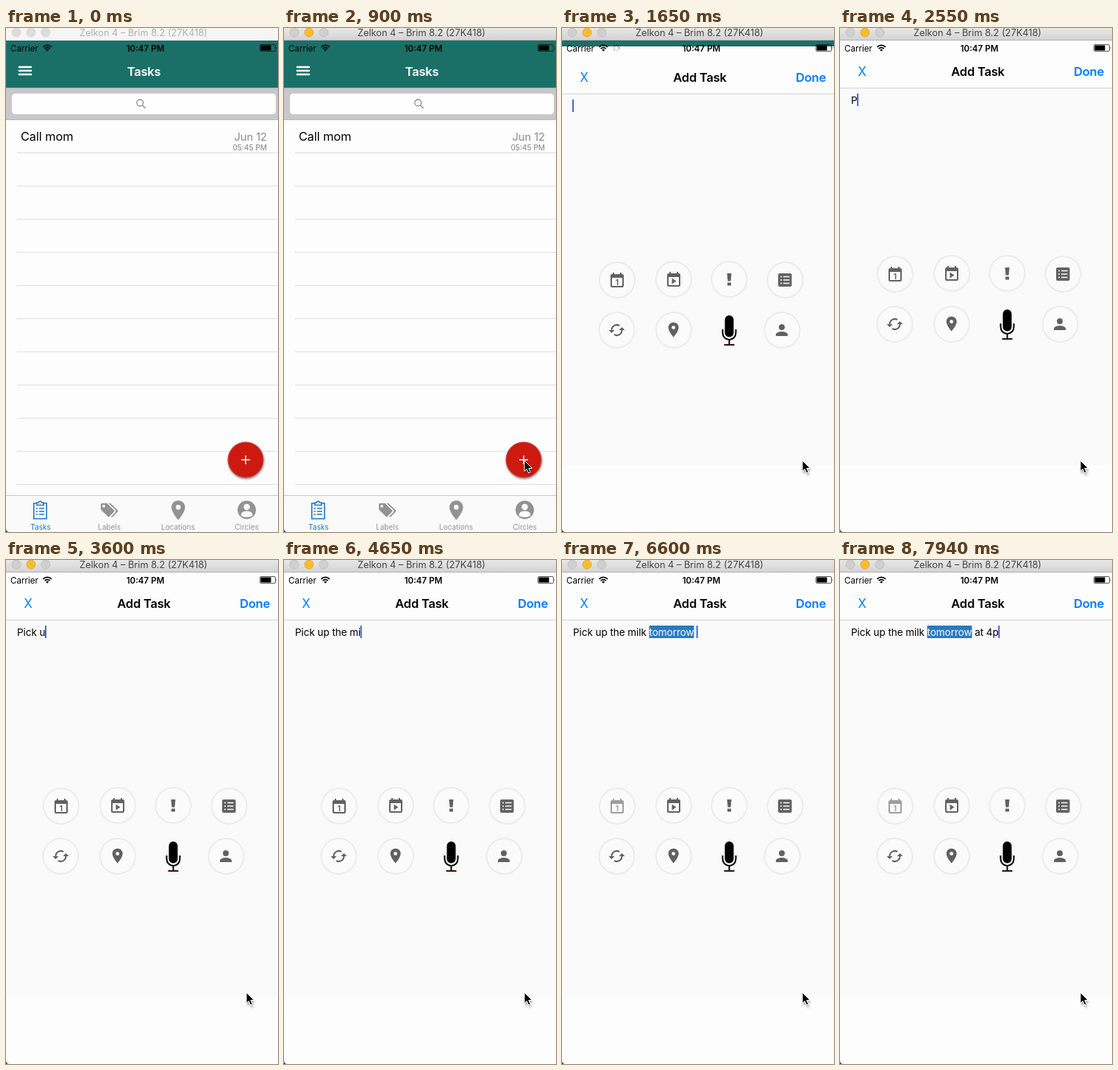
An HTML page that plays this animation: 370 by 684 pixels, repeating every 8000 ms.

```html
<!DOCTYPE html>
<html lang="en">
<head>
<meta charset="utf-8">
<title>Add Task</title>
<style>
  html, body { margin: 0; width: 100%; height: 100%; overflow: hidden; background: #fdfdfd; }
  svg { display: block; width: 370px; height: 684px; font-family: Inter, "Liberation Sans", sans-serif; }
  text { white-space: pre; }
  .mid { text-anchor: middle; }
  .end { text-anchor: end; }
  .nav { font-size: 16.6px; font-weight: 600; letter-spacing: -.25px; }
  .tab { font-size: 10px; text-anchor: middle; fill: #929292; }
  .ring { fill: #fbfbfb; stroke: #ececec; stroke-width: 2; }
  .note { font-size: 13.6px; letter-spacing: -.1px; }
</style>
</head>
<body>
<svg viewBox="0 0 370 684">
  <defs>
    <linearGradient id="bar" x2="0" y2="1"><stop stop-color="#e8e8e8"/><stop offset="1" stop-color="#d2d2d2"/></linearGradient>
    <filter id="soft" x="-30%" y="-30%" width="160%" height="160%"><feGaussianBlur stdDeviation="1.4"/></filter>
    <path id="cal" d="M19 4h-1V2h-2v2H8V2H6v2H5c-1.1 0-2 .9-2 2v14c0 1.1.9 2 2 2h14c1.1 0 2-.9 2-2V6c0-1.1-.9-2-2-2zm0 16H5V9h14z"/>
    <path id="pin" d="M12 2C8.1 2 5 5.1 5 9c0 5.2 7 13 7 13s7-7.8 7-13c0-3.9-3.1-7-7-7zm0 9.5a2.5 2.5 0 010-5 2.5 2.5 0 010 5z"/>
    <path id="person" d="M12 12a4 4 0 100-8 4 4 0 000 8zm0 2c-2.7 0-8 1.3-8 4v2h16v-2c0-2.7-5.3-4-8-4z"/>
    <path id="cycle" d="M19 8l-4 4h3a6 6 0 01-8.8 5.3l-1.5 1.5A8 8 0 0020 12h3zM6 12a6 6 0 018.8-5.3l1.5-1.5A8 8 0 004 12H1l4 4 4-4z"/>
  </defs>

  <!-- task list -->
  <rect width="370" height="684" fill="#fdfdfd"/>
  <rect y="17" width="370" height="64.5" fill="#1a7067"/>
  <path d="M18 53h16M18 58h16M18 63h16" stroke="#fff" stroke-width="2.6" stroke-linecap="round"/>
  <text class="nav mid" x="187.5" y="65" fill="#fff">Tasks</text>
  <rect y="81.5" width="370" height="43.5" fill="#c8c8cc"/>
  <path d="M0 82h370M0 124.5h370" stroke="#b9b9bd"/>
  <rect x="8" y="89" width="359" height="28" rx="4.5" fill="#fefefe"/>
  <g fill="none" stroke="#77777b" stroke-width="1.1"><circle cx="182.3" cy="101.5" r="4.4"/><path d="M185.5 104.8l4.2 4.2"/></g>
  <path id="lines" stroke="#dededf"/>
  <text x="20" y="153" font-size="16.4" letter-spacing="-.1">Call mom</text>
  <text class="end" x="355" y="153" font-size="14.6" fill="#8a8a8a">Jun 12</text>
  <text class="end" x="355" y="166" font-size="10.2" fill="#808080">05:45 PM</text>

  <rect y="634" width="370" height="50" fill="#fafafa"/>
  <path d="M0 634.5h370" stroke="#c4c4c6"/>
  <g fill="none" stroke="#1a78c4" stroke-width="1.6">
    <path d="M42 645h-4.2v21h17.4v-21H51"/>
    <path d="M42 647.5v-3.3h2.5a2 2 0 014 0H51v3.3z"/>
    <path d="M41 652h2m2 0h7m-11 4h2m2 0h7m-11 4h2m2 0h7"/>
  </g>
  <g fill="#929292">
    <path fill-rule="evenodd" d="M129 646.5q0-1.5 1.5-1.5h7l9.5 9.5q1 1 0 2l-6.500 6.500q-1 1-2 0l-9.500-9.500zm4 .5a1.900 1.900 0 100 3.800 1.900 1.900 0 000-3.800z"/>
    <path d="M139.500 645h2.500l10 9.500q1 1 0 2l-6.500 6.500q-1.400 1.400-2.700.2l6-6q1.500-1.600 0-3.100z"/>
    <use href="#pin" transform="translate(218.500 638.500) scale(1.320)"/>
    <circle cx="327.500" cy="654" r="12.500"/>
  </g>
  <g fill="#fafafa"><circle cx="327.500" cy="650" r="4.300"/><path d="M319.500 661.500q0-6 8-6t8 6q-3 2.500-8 2.500t-8-2.500z"/></g>
  <text class="tab" x="47" y="681" style="fill:#1a78c4">Tasks</text>
  <text class="tab" x="140.500" y="681">Labels</text>
  <text class="tab" x="234" y="681">Locations</text>
  <text class="tab" x="327.500" y="681">Circles</text>

  <circle cx="326.500" cy="587.500" r="24.500" fill="#555" opacity=".75" filter="url(#soft)"/>
  <circle id="fab" cx="326" cy="586" r="24" fill="#cc1a10" stroke="#d8473d"/>
  <path d="M326 580v12m-6-6h12" stroke="#fff" stroke-width="1.400"/>

  <!-- add-task sheet -->
  <g id="sheet">
    <rect y="17" width="370" height="667" fill="#fdfdfd"/>
    <rect y="81" width="370" height="603" fill="#fafafa"/>
    <path d="M0 81.500h370" stroke="#d3d3d5"/>
    <g class="nav">
      <text x="24.500" y="65" fill="#007aff" font-weight="400">X</text>
      <text class="mid" x="187.500" y="65">Add Task</text>
      <text class="end" x="359" y="65" fill="#007aff">Done</text>
    </g>
    <rect id="mark" y="89" height="17" fill="#2a7ac0"/>
    <text class="note" x="15" y="102.500"><tspan id="head"></tspan><tspan id="day"></tspan><tspan id="tail"></tspan></text>
    <rect id="caret" y="89" width="2" height="17" fill="#4a62d8"/>
    <g id="rings"></g>
    <g fill="#616161">
      <g id="date"><use href="#cal" x="63" y="322"/><text class="mid" x="75" y="340.500" font-size="10" font-weight="700">1</text></g>
      <use href="#cal" x="140" y="321"/><path d="M149.500 331.500v8l6-4z"/>
      <path d="M224.500 325h6l-1 10.500h-4zM225 337.500h5v4h-5z"/>
      <rect x="294" y="325" width="18.500" height="18" rx="2"/>
      <path d="M297 329.500h2m2 0h8.500M297 334h2m2 0h8.500M297 338.500h2m2 0h8.500" stroke="#fafafa" stroke-width="1.700"/>
      <use href="#cycle" x="62.500" y="390"/>
      <use href="#pin" x="139.700" y="389.500"/>
      <use href="#person" x="287" y="390"/>
    </g>
    <rect x="221.500" y="382" width="12" height="29.500" rx="6"/>
    <path d="M218.500 401v4.500a9 9.500 0 0018 0V401M227.500 415v6" fill="none" stroke="#000" stroke-width="2"/>
    <path d="M220.500 422h14" stroke="#3a0d0d" stroke-width="2"/>
  </g>
  <rect id="base" y="593.500" width="370" height="91" fill="#fdfdfd"/>

  <!-- status bar -->
  <text x="6" y="31.500" font-size="11.600">Carrier</text>
  <g fill="none" stroke="#000" stroke-width="1.700"><path d="M50.500 25.800a8 8 0 0111.500 0M52.700 28.200a5 5 0 017.100 0"/></g>
  <path d="M54.200 29.800a3 3 0 014.100 0l-2.050 2z"/>
  <g id="spin"></g>
  <text class="mid" x="189.500" y="31.500" font-size="11.600" font-weight="600">10:47 PM</text>
  <rect x="345.500" y="22.500" width="21" height="9" rx="1.500" fill="none" stroke="#000" stroke-opacity=".65"/>
  <path d="M346.500 23.500h14v7h-14zM367.500 25.500q1.500 1.500 0 3z"/>

  <!-- window bar -->
  <rect id="top" width="370" height="17"/>
  <path id="edge" d="M0 16.500h370" stroke="#b2b2b2"/>
  <g id="lights" stroke-width=".8"><circle cx="14" cy="6" r="6"/><circle cx="34" cy="6" r="6"/><circle cx="54" cy="6" r="6"/></g>
  <text id="title" class="mid" x="187" y="11" font-size="12.800">Zelkon 4 – Brim 8.2 (27K418)</text>
  <path d="M0 679q0 5 5 5H0z" fill="#3a3f55"/>
  <g id="mouse">
    <path d="M1 3v15l3.500-3 2.500 5.500 2.500-1-2.500-5.500h5z" opacity=".35" filter="url(#soft)"/>
    <path d="M0 0v14.500l3.300-3 2.400 5.500 2.500-1.100-2.400-5.400h4.600z" stroke="#fff"/>
  </g>
</svg>
<script>
const LOOP = 8000, STEP = 150;
const $ = id => document.getElementById(id);
const show = (id, on) => $(id).style.display = on ? "" : "none";
const fill = (el, color) => el.setAttribute("fill", color);

const NOTE = "Pick up the milk tomorrow at 4p";
const DAY = NOTE.indexOf("tomorrow"), DAY_END = DAY + 8;
// [time, letters typed]
const TYPED = [
  [0, 0], [2550, 1], [2700, 2], [2850, 3], [3000, 4],
  [3600, 6], [3750, 7], [3900, 8], [4050, 9], [4200, 11], [4350, 12],
  [4650, 14], [4950, 16], [5250, 18], [5400, 19], [5550, 20], [5700, 21],
  [5850, 23], [6000, 24], [6150, 25], [6450, 26], [6750, 27], [6900, 28],
  [7050, 29], [7650, 30], [7940, 31]
];
const RINGS = [[75, 334], [152, 333], [227.5, 333], [303.5, 334], [74.5, 402], [152, 402], [299.5, 402]];

$("lines").setAttribute("d", Array.from({ length: 11 }, (_, i) => `M15 ${169.5 + i * 45}h355`).join(""));
$("rings").innerHTML = RINGS.map(([x, y]) => `<circle class="ring" cx="${x}" cy="${y}" r="24"/>`).join("");
$("spin").innerHTML = Array.from({ length: 8 }, (_, i) =>
  `<path d="M74 24.500v-2.500" stroke="#222" stroke-width="1.200" transform="rotate(${i * 45} 74 27)"/>`).join("");

function drawNote(t) {
  const count = TYPED.filter(([at]) => at <= t).pop()[1];
  const text = NOTE.slice(0, count);
  const parts = [text.slice(0, DAY), text.slice(DAY, DAY_END), text.slice(DAY_END)];
  ["head", "day", "tail"].forEach((id, i) => $(id).textContent = parts[i]);
  const width = id => $(id).textContent ? $(id).getComputedTextLength() : 0;
  const start = 15 + width("head"), stop = start + width("day");
  const marked = t >= 6450;
  show("mark", marked);
  $("mark").setAttribute("x", start);
  $("mark").setAttribute("width", stop - start);
  fill($("day"), marked ? "#fff" : "#000");
  $("caret").setAttribute("x", stop + width("tail") - (count ? .5 : 1));
  show("caret", t < 2400 || t >= 2550);
  $("date").setAttribute("opacity", marked ? .6 : 1);
}

function drawSheet(t) {
  // critically damped spring
  const w = Math.max(0, (t - 1289) * .018);
  const y = Math.round(667 * (1 + w) * Math.exp(-w));
  show("sheet", y < 667);
  show("base", y < 500);
  $("sheet").setAttribute("transform", `translate(0 ${y})`);
}

function drawWindow(t) {
  const active = t >= 600;
  fill($("top"), active ? "url(#bar)" : "#f6f6f6");
  show("edge", active);
  [...$("lights").children].forEach((c, i) => {
    const amber = active && i === 1;
    fill(c, amber ? "#fdbc2f" : active ? "#d0d0d0" : "#dcdcdc");
    c.setAttribute("stroke", amber ? "#dfa023" : active ? "#b9b9b9" : "#d0d0d0");
  });
  fill($("title"), active ? "#444" : "#b0b0b0");
}

function drawPointer(t) {
  const p = Math.min(1, Math.max(0, (t - 300) / 600)), rest = (1 - p) ** 2;
  show("mouse", t >= 450);
  $("mouse").setAttribute("transform", `translate(${327 + 70 * rest} ${587 + 50 * rest})`);
  fill($("fab"), t >= 1050 && t < 1350 ? "#b0150d" : "#cc1a10");
}

function drawSpinner(t) {
  show("spin", t >= 1200 && t < 2100);
  [...$("spin").children].forEach((ray, i) =>
    ray.setAttribute("opacity", .2 + .6 * ((i - t / STEP + 80) % 8) / 8));
}

function draw(t) {
  const q = Math.floor(t / STEP) * STEP;
  drawWindow(q);
  drawPointer(q);
  drawSpinner(q);
  drawSheet(q);
  drawNote(t);
}

const begin = performance.now();
function tick(now) {
  draw(Math.max(0, now - begin) % LOOP);
  requestAnimationFrame(tick);
}
draw(0);
requestAnimationFrame(tick);
</script>
</body>
</html>
```
